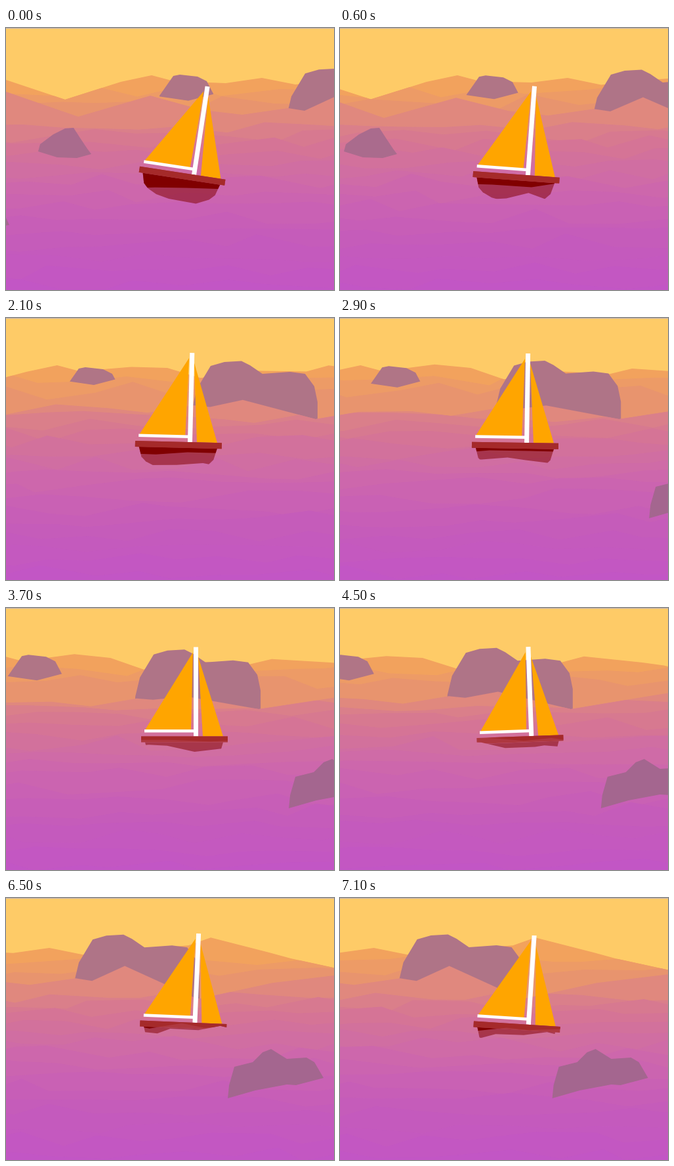
Animation of 500 by 399 pixels, one loop 7.2 s. Source, as an HTML page with a canvas:

```html
<!DOCTYPE html>
<html lang="en">
<head>
<meta charset="utf-8">
<title>Sailing at dusk</title>
<style>
  html, body { margin: 0; width: 100%; height: 100%; overflow: hidden; background: #fecb68; }
  canvas { display: block; width: 500px; height: 399px; }
</style>
</head>
<body>
<canvas id="stage" width="500" height="399"></canvas>
<script>
const W = 500, H = 399, LOOP = 7200, STEP = 100, TAU = 2 * Math.PI;
const ctx = document.getElementById('stage').getContext('2d');

// Water colours by height on the stage.
const tones = [
  [78, 243, 164, 91], [100, 236, 154, 104], [122, 228, 141, 118], [145, 221, 131, 133],
  [180, 213, 117, 149], [215, 208, 110, 163], [260, 203, 100, 176], [320, 197, 91, 187], [399, 194, 86, 197]
];

// Boat poses: time, x, y, tilt and depth of hull above water.
const poses = [
  [0, 205, 211, 8.7, 60], [1.1, 203, 219, 1.4, 26], [2.1, 198, 187, 1.4, 37], [3.7, 207, 195.5, 0, 17],
  [5.3, 210, 198, -3.2, 4], [6.5, 205.5, 186.5, 2.4, 14], [7.1, 205, 187.5, 3.7, 22]
];

// Crests in scene coordinates: x, mean y, heave.
const horizon = [
  [0, 79, 0], [90, 106, -3], [175, 82, 0], [222, 72, 0], [256, 81, 0], [335, 77, -7], [390, 76, 0],
  [441, 90, 4], [500, 80, 0], [602, 79, 7], [636, 69, 9], [725, 83, 0], [758, 89, -3], [850, 112, 0]
];
const swell = [
  [0, 102, 5], [110, 149, 14], [220, 124, 21], [300, 134, 9], [360, 141, 9], [430, 130, 8],
  [455, 133, 7], [505, 119, 16], [616, 154, 0], [730, 133, 4], [850, 115, 0]
];

// Rocks in scene coordinates.
const bigRock = [427,160, 428,134, 435,105, 456,70, 477,64, 503,62.5, 516,69, 535,82, 577,79, 600,82, 614,101, 619,125, 619,160];
const smallRock = [234,120, 234,103, 255,73, 265,71, 292,74, 306,81, 316,100, 316,120];
const leftRock = [49,188, 52,177, 72,162, 90,153, 103,152, 112,166, 124,184, 130,192, 108,198, 78,197];
const nearRock = [662,305, 664,285, 672,257, 700,250, 715,235, 728,230, 752,245, 782,243, 794,250, 808,274, 766,285, 752,284, 704,293];

// Boat parts, measured from the left end of the deck.
const deck = [-1,0, 131,0, 131,9, -1,9];
const hull = [5,9, 9,24, 16,31, 30,38, 50,42, 92,43, 111,34, 119,26, 124,9];
const mainSail = [78,-128, 5,-10, 75,-10];
const jib = [86,-121, 93,0, 124,0];
const mast = [79,-136, 86,-136, 86,0, 79,0];
const boom = [4,-10.5, 81,-10.5, 81,-6, 4,-6];

const mix = (a, b, u) => a + (b - a) * u;
const rand = n => { const s = Math.sin(n * 127.1 + 11.7) * 43758.5453; return s - Math.floor(s); };

// The scene slides left and gradually slows down.
const travel = t => 48 * t + 53.5 * Math.sin(t * Math.PI / 7);
const heave = t => -Math.cos(TAU * t / 6.8);

function segment(rows, v) {
  let i = 0;
  while (i < rows.length - 2 && v >= rows[i + 1][0]) i++;
  return i;
}

function tone(y) {
  const i = segment(tones, y), [a, b] = [tones[i], tones[i + 1]];
  const u = Math.min(Math.max((y - a[0]) / (b[0] - a[0]), 0), 1);
  return `rgb(${[1, 2, 3].map(c => Math.round(mix(a[c], b[c], u)))})`;
}

// Smooth curve through one column of the poses.
function pose(col, t) {
  const i = segment(poses, t), p = poses[i], q = poses[i + 1];
  const slope = k => {
    const a = poses[Math.max(k - 1, 0)], b = poses[Math.min(k + 1, poses.length - 1)];
    return (b[col] - a[col]) / (b[0] - a[0]);
  };
  const h = q[0] - p[0], u = (t - p[0]) / h, s = u * u * (3 - 2 * u);
  return mix(p[col], q[col], s) + h * u * (1 - u) * ((1 - u) * slope(i) - u * slope(i + 1));
}

function trace(pts, dx = 0, dy = 0) {
  ctx.beginPath();
  for (let i = 0; i < pts.length; i += 2) ctx.lineTo(pts[i] + dx, pts[i + 1] + dy);
  ctx.closePath();
}

function fill(pts, color, dx, dy) {
  trace(pts, dx, dy);
  ctx.fillStyle = color;
  ctx.fill();
}

// Closes a ridge line along the bottom or the top of the stage.
const closed = (pts, y) => [...pts, pts[pts.length - 2], y, pts[0], y];
const fillBelow = (pts, color) => fill(closed(pts, H + 2), color);

function above(pts, draw) {
  ctx.save();
  trace(closed(pts, -2));
  ctx.clip();
  draw();
  ctx.restore();
}

const crest = (points, t) => points.flatMap(([x, y, amp]) => [x - travel(t), y + amp * heave(t)]);

// Random ridge whose points each circle around their own spot.
function ripple(seed, base, t, gap = 64, size = 9) {
  const d = travel(t), first = Math.floor(d / gap) - 2, pts = [];
  for (let n = first; n * gap < d + W + 2 * gap; n++) {
    const id = n + seed * 53, a = TAU * rand(id) + t * (0.7 + 0.6 * rand(id + 900));
    const r = size * (0.4 + 0.6 * rand(id + 400));
    pts.push((n + 0.5 * rand(id + 70)) * gap - d + r * Math.cos(a),
             base + size * 1.6 * (rand(id + 200) - 0.5) + r * Math.sin(a));
  }
  return pts;
}

function boat(t) {
  const [x, y, tilt, depth] = [1, 2, 3, 4].map(col => pose(col, t));
  const placed = draw => {
    ctx.save();
    ctx.translate(x, y);
    ctx.rotate(tilt * Math.PI / 180);
    draw();
    ctx.restore();
  };
  const body = (hullAlpha, deckAlpha) => placed(() => {
    ctx.globalAlpha = hullAlpha;
    fill(hull, '#800000');
    ctx.globalAlpha = deckAlpha;
    fill(deck, '#a52a2a');
  });
  placed(() => {
    fill(mainSail, '#ffa500');
    fill(jib, '#ffa500');
    fill(boom, '#fff');
    fill(mast, '#fff');
  });
  above(ripple(31, y + depth, t, 36, 5), () => {
    body(0.52, 0.8);
    above(ripple(32, y + depth / 2, t, 52, 5), () => body(1, 1));
  });
}

function rocksBehind(t) {
  const d = travel(t), lift = Math.cos(TAU * (t - 4.1) / 4.3);
  const cut = 4.5 * lift - 1.5;
  fill(bigRock, '#af7487', -d, 5 * Math.cos(0.63 * (t - 2.1)) - 2);
  above([230 - d, 101 + cut, 278 - d, 108 + cut, 320 - d, 97 + cut],
    () => fill(smallRock, '#b07586', -d, 2 - 2 * lift));
}

function paint(t) {
  const d = travel(t);
  ctx.fillStyle = '#fecb67';
  ctx.fillRect(0, 0, W, H);

  const back = crest(horizon, t);
  fillBelow(back, tone(82));
  ctx.save();
  trace(closed(back, H + 2));
  ctx.clip();
  fillBelow(ripple(1, 96, t), tone(97));
  fillBelow(ripple(2, 110, t), tone(110));
  ctx.restore();

  rocksBehind(t);
  const mid = crest(swell, t);
  fillBelow(mid, tone(134));
  ctx.save();
  trace(closed(mid, H + 2));
  ctx.clip();
  for (let k = 0; k < 15; k++) {
    const base = 148 + k * 13 + k * k * 0.3;
    fillBelow(ripple(k + 3, base, t), tone(base + 8));
  }
  ctx.restore();

  fill(leftRock, '#aa6b8d', -d);
  fill(nearRock, '#a4668f', -d);
  fill([-8,284, 0,289, 5,300, -8,302], '#a4668f', -d);

  boat(t);
  ctx.fillStyle = '#c2b2b2';
  ctx.fillRect(0, 0, W, 1);
}

function tick() {
  const ms = performance.now() % LOOP;
  paint(Math.floor(ms / STEP) * STEP / 1000);
  requestAnimationFrame(tick);
}
tick();
</script>
</body>
</html>
```
